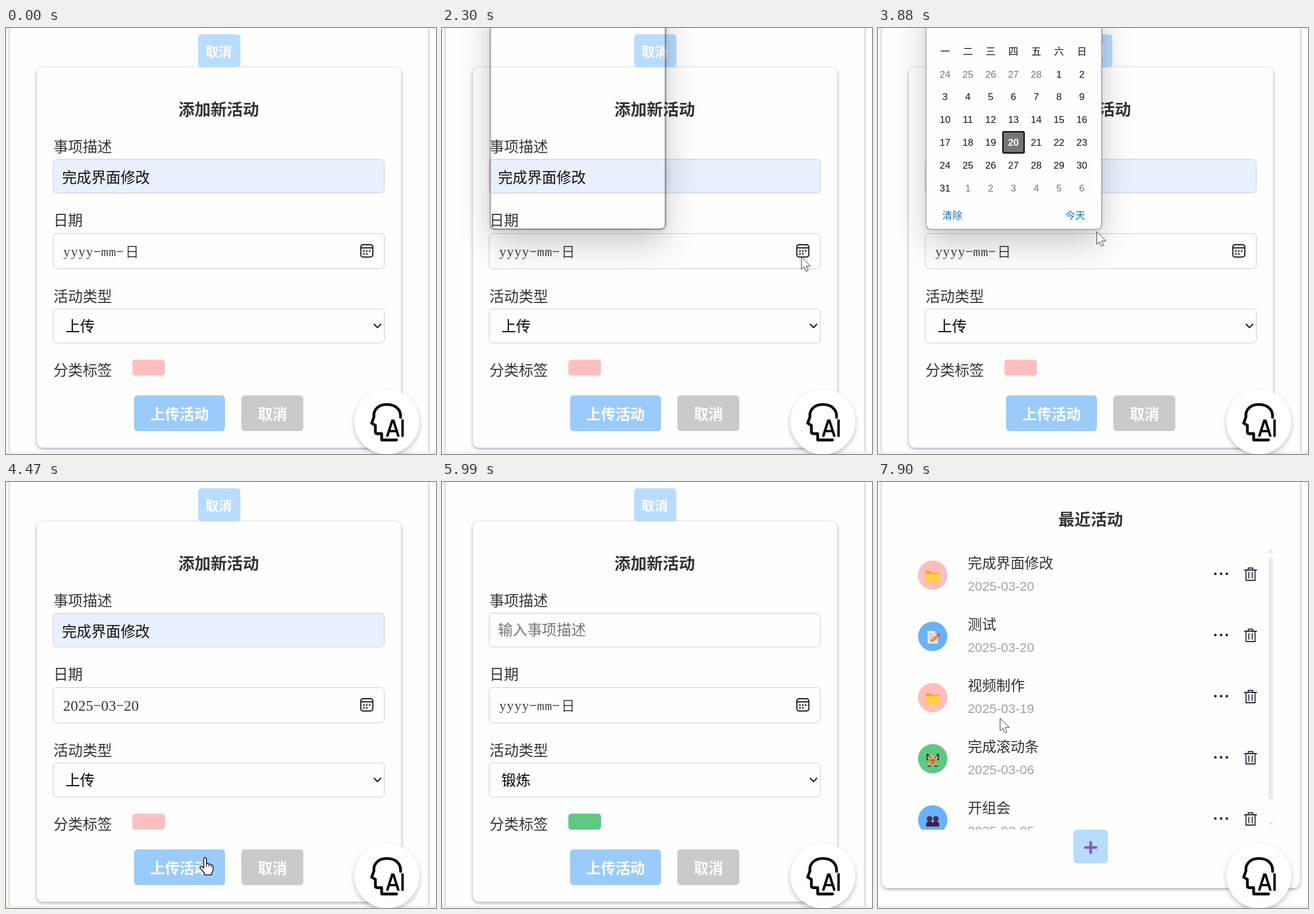
Write an HTML page with a canvas that moves like this. It is 752 px wide and 745 px high and loops after 8000 ms.

```html
<!DOCTYPE html>
<html lang="zh-CN">
<head>
<meta charset="utf-8">
<title>添加新活动</title>
<style>
html, body { margin: 0; width: 100%; height: 100%; overflow: hidden; background: #fff; }
canvas { display: block; width: 752px; height: 745px; }
</style>
</head>
<body>
<canvas id="stage" width="752" height="745"></canvas>
<script>
const ctx = document.getElementById('stage').getContext('2d');
const LOOP = 8000;
const CJK = '"Noto Sans CJK SC", "Noto Sans CJK", sans-serif';
const ARIAL = '"Liberation Sans", Arial, sans-serif';
const SERIF = '"Liberation Serif", serif';
const MONO = '"Liberation Mono", monospace';

// time, x, y of the pointer tip
const PATH = [
  [50, 72, 0], [800, 481, 319], [900, 481, 319], [1000, 498, 335],
  [1670, 591, 380], [1770, 591, 380], [2150, 628, 399], [2300, 628, 400],
  [2560, 567, 438], [2580, 567, 438], [3380, 361, 367], [3480, 361, 367],
  [3880, 382, 356], [4130, 345, 327], [4300, 345, 327], [4460, 348, 657],
  [4490, 348, 657], [4750, 370, 680], [5080, 332, 674], [5180, 331, 674],
  [5990, 331, 674], [6310, 392, 12], [6450, 376, 36], [6560, 376, 36],
  [7100, 192, 381], [7140, 192, 381], [7410, 201, 388], [7650, 202, 389],
  [7900, 213, 413], [8000, 213, 413]
];

const ROWS = [
  ['完成界面修改', '2025-03-20', '#ffbdbd', folder],
  ['测试', '2025-03-20', '#68b1fb', memo],
  ['视频制作', '2025-03-19', '#ffbdbd', folder],
  ['完成滚动条', '2025-03-06', '#5fc882', lifter],
  ['开组会', '2025-03-05', '#68b1fb', people]
];

function pointer(t) {
  let i = 1;
  while (i < PATH.length - 1 && PATH[i][0] < t) i++;
  const [t0, x0, y0] = PATH[i - 1], [t1, x1, y1] = PATH[i];
  const k = Math.min(1, Math.max(0, (t - t0) / (t1 - t0)));
  const e = k * 0.5 + k * k * (3 - 2 * k) * 0.5;
  return [Math.round(x0 + (x1 - x0) * e), Math.round(y0 + (y1 - y0) * e)];
}

function box(x, y, w, h, r, fill, line, lw = 1) {
  ctx.beginPath();
  ctx.roundRect(x, y, w, h, r);
  if (fill) { ctx.fillStyle = fill; ctx.fill(); }
  if (line) { ctx.strokeStyle = line; ctx.lineWidth = lw; ctx.stroke(); }
}

function disc(x, y, r, fill) {
  ctx.beginPath();
  ctx.arc(x, y, r, 0, Math.PI * 2);
  ctx.fillStyle = fill;
  ctx.fill();
}

function trace(d, fill, line, lw = 1) {
  const p = new Path2D(d);
  if (fill) { ctx.fillStyle = fill; ctx.fill(p); }
  if (line) { ctx.strokeStyle = line; ctx.lineWidth = lw; ctx.stroke(p); }
}

function shadowed(dy, blur, alpha, draw) {
  ctx.save();
  ctx.shadowColor = `rgba(0,0,0,${alpha})`;
  ctx.shadowBlur = blur;
  ctx.shadowOffsetY = dy;
  draw();
  ctx.restore();
}

// y is the middle of the line
function cjk(s, x, y, size, color, weight = 350, align = 'left') {
  ctx.font = `${weight} ${size}px ${CJK}`;
  ctx.textAlign = align;
  ctx.fillStyle = color;
  ctx.fillText(s, x, y + size * 0.38);
}

function latin(s, x, base, font, color, align = 'left') {
  ctx.font = font;
  ctx.textAlign = align;
  ctx.fillStyle = color;
  ctx.fillText(s, x, base);
}

function card(x, y, w, h) {
  shadowed(2, 6, 0.36, () => box(x, y, w, h, 11, '#fefefe'));
}

function dateText(s) {
  [...s].forEach((c, i) => {
    const x = 99.5 + 13.3 * (i + 0.5);
    if (c === '日') cjk(c, x + 8, 391, 24, '#444', 300, 'center');
    else if (c === 'm') latin(c, x, 399, `21px ${MONO}`, '#444', 'center');
    else if (c === '-') { ctx.fillStyle = '#444'; ctx.fillRect(x - 5.5, 390, 11, 1.5); }
    else if (c === 'y') latin(c, x, 399, `24px ${SERIF}`, '#444', 'center');
    else latin(c, x, 400, `26px ${SERIF}`, '#333', 'center');
  });
}

function calendarIcon() {
  box(620.5, 379, 21, 21.5, 4, null, '#111', 2);
  ctx.fillStyle = '#111';
  ctx.fillRect(621, 383.5, 20, 2);
  for (let i = 0; i < 5; i++) disc(626 + (i % 3) * 5, i < 3 ? 390 : 395, 1.5, '#111');
}

function form(t) {
  const done = t >= 5990, picked = t >= 4230 && !done;
  card(7, -40, 731, 860);
  card(54, 69, 637, 665);
  box(336, 11, 74, 58, 6, '#b9dcfe');
  cjk('取消', 372, 41, 23, '#fff', 900, 'center');
  cjk('添加新活动', 372, 142, 28.2, '#333', 700, 'center');

  cjk('事项描述', 83, 207, 25.6, '#333');
  cjk('日期', 83, 336, 25.6, '#333');
  cjk('活动类型', 83, 469, 25.6, '#333');
  cjk('分类标签', 83, 598, 25.6, '#333');

  box(82.5, 229.5, 579, 59, 6, done ? '#fefefe' : '#e8f0fe', '#c9c9c9');
  if (done) cjk('输入事项描述', 98, 258, 25.6, '#757575');
  else cjk('完成界面修改', 98, 261, 25.6, '#111');

  box(82.5, 359.5, 579, 61.5, 6, '#fefefe', '#c9c9c9');
  dateText(picked ? '2025-03-20' : 'yyyy-mm-日');
  calendarIcon();

  box(82.5, 491, 579, 60, 6, '#fefefe', '#c9c9c9');
  cjk(done ? '锻炼' : '上传', 104, 521, 25.6, '#000');
  trace('M644 518l5.7 6 5.7-6', null, '#111', 2);

  box(221, 580, 57, 28, 5, done ? '#60c883' : '#ffbfbf');
  const hover = t > 4490 && !done;
  box(224, 642.5, 159, 62.5, 6, hover ? '#90c4f9' : '#9acbfc');
  cjk('上传活动', 303.5, 675.5, 25.6, '#fff', 900, 'center');
  box(411.5, 642.5, 108.5, 62.5, 6, '#cacaca');
  cjk('取消', 466, 675.5, 25.6, '#fff', 900, 'center');
}

function popup(open) {
  const shape = () => ctx.roundRect(84, -60, 307.5, 412.5, 8);
  ctx.save();
  ctx.beginPath();
  ctx.rect(0, -200, 752, 945);
  shape();
  ctx.clip('evenodd');
  for (const [dy, blur, a] of [[26, 58, 0.2], [1, 10, 0.1]])
    shadowed(dy, blur, a, () => { ctx.beginPath(); shape(); ctx.fillStyle = '#000'; ctx.fill(); });
  ctx.restore();
  if (!open) {
    box(84.5, -60, 306, 411.5, 8, null, 'rgba(90,90,90,.48)', 2.5);
    return;
  }
  box(84.5, -60, 306.5, 412, 8, '#fefefe', '#a4a4a4', 1.2);
  const colX = c => 117.3 + c * 39.85;
  [...'一二三四五六日'].forEach((c, i) => cjk(c, colX(i), 41, 17, '#111', 400, 'center'));
  for (let i = 0; i < 42; i++) {
    const day = i < 5 ? 24 + i : i < 36 ? i - 4 : i - 35;
    const other = i < 5 || i > 35, today = i === 24;
    const x = colX(i % 7), y = 80.5 + Math.floor(i / 7) * 39.85;
    if (today) box(218.5, 181.5, 37, 37, 2, '#767676', '#111', 2.5);
    latin(day, x, y + 6, `${today ? 'bold ' : ''}17px ${ARIAL}`,
      today ? '#fff' : other ? '#767676' : '#111', 'center');
  }
  cjk('清除', 112.5, 327.5, 17.4, '#0074d1');
  cjk('今天', 327.5, 327.5, 17.4, '#0074d1');
}

function folder() {
  trace('M-12-9h8l3 3h12q1 0 1 1v6h-24z', '#f5a81c');
  box(-12, -4, 24, 15, 1.5, '#ffd140');
}

function memo() {
  trace('M-9-11h12l6 6v16h-18z', '#f1eaf5');
  trace('M3-11v6h6z', '#cbbdda');
  trace('M-6-5h7M-6-1h9M-6 3h5', null, '#b7a5c8', 1.3);
  trace('M-4 8l2-5 9-8 4 4-9 8z', '#ff8a2a');
  trace('M7-5l2-2q3 0 4 4l-2 2z', '#e6395d');
  trace('M-4 8l1.3-3 1.8 2z', '#50333c');
}

function lifter() {
  trace('M-9-4h18', null, '#474052', 1.6);
  box(-11, -10, 4, 11, 1, '#393344');
  box(7, -10, 4, 11, 1, '#393344');
  trace('M-8-4l4 5M8-4l-4 5', null, '#ffb04a', 3);
  disc(0, -4.5, 3.2, '#ffb04a');
  trace('M-5-1h10l-1.5 8h-7z', '#f4572e');
  trace('M-3 5l-4 2 1 4M3 5l4 2-1 4', null, '#ffa23d', 2.6);
  trace('M-8 11.5h4M4 11.5h4', null, '#393344', 2);
}

function people() {
  for (const x of [-5.5, 5.5]) {
    disc(x, -3.5, 4.8, '#4b2c53');
    trace(`M${x - 6} 10v-4q0-5 6-5t6 5v4z`, '#3b2247');
  }
}

function trash(x, y) {
  trace(`M${x - 10.5} ${y - 7}h21M${x - 4} ${y - 7}v-3.5h8v3.5M${x - 8} ${y - 7}v18h16v-18` +
    `M${x - 3} ${y - 3}v10M${x + 3} ${y - 3}v10`, null, '#24243a', 1.8);
}

function list() {
  card(7, -40, 731, 750);
  cjk('最近活动', 372, 65, 28.2, '#333', 700, 'center');
  ctx.save();
  ctx.beginPath();
  ctx.rect(0, 0, 752, 608);
  ctx.clip();
  ROWS.forEach(([name, date, color, icon], i) => {
    const y = 163 + i * 107;
    disc(95.7, y, 25.7, color);
    ctx.save();
    ctx.translate(95.7, y + 1.5);
    icon();
    ctx.restore();
    cjk(name, 157, y - 21, 24.9, '#333');
    latin(date, 157, y + 27, `22.7px ${ARIAL}`, '#a2a2ac');
    for (let k = 0; k < 3; k++) box(588 + k * 10, y - 4.5, 4, 4, 1, '#111');
    trash(651.5, y - 2);
  });
  box(683, 132, 8, 423, 4, '#ebebeb');
  trace('M682.5 124l4.5-6.5 4.5 6.5zM682.5 594.5l4.5 6.5 4.5-6.5z', '#e6e6e6');
  ctx.restore();
  box(342, 608, 60, 59, 6, '#b9dcfe');
  trace('M372 630v18.5M362.8 639.2h18.5', null, '#7b5bc4', 4.6);
}

function assistant() {
  shadowed(4, 8, 0.24, () => disc(666, 688.5, 57, '#fff'));
  trace('M690 681C691 667 681 658.3 666 658.3C650 658.3 642 669 643.5 680L639.5 691L646 695' +
    'V706Q646 709.5 650 709.5H657V720.5H683', null, '#000', 4.8);
  trace('M667 713L675.5 686.5H677.5L686 713M670 705H683M693.5 686V713.5', null, '#000', 4.2);
}

function arrow(x, y) {
  ctx.save();
  ctx.translate(x + 0.5, y + 0.5);
  trace('M0 0V21.5L4.8 17.2L8.2 25.2L12 23.6L8.7 15.8H15.5Z', '#fff', '#334', 1);
  ctx.restore();
}

function hand(x, y) {
  ctx.save();
  ctx.translate(x, y);
  trace('M-2.2 2.2Q-2 0 .2 0Q2.4 0 2.6 2.2V11Q5 9 7 11.5Q9.5 10.5 11 13Q14 12.5 14.3 16V21' +
    'Q14 25 11.5 27V30H-1V27L-8.5 18Q-9.5 15.5-7 15Q-5 15-2.2 18Z', '#fff', '#111', 1.5);
  trace('M2.6 11v4M7 11.8v4M11 13.2v3.4', null, '#111', 1.2);
  ctx.restore();
}

function draw(t) {
  ctx.clearRect(0, 0, 752, 745);
  ctx.fillStyle = '#fff';
  ctx.fillRect(0, 0, 752, 745);
  ctx.lineCap = ctx.lineJoin = 'round';
  const listed = t >= 6550;
  if (listed) list(); else form(t);
  ctx.fillStyle = '#f0f0f0';
  ctx.fillRect(0, 741.5, 752, 4);
  assistant();
  if (t >= 2300 && t < 4230) popup(t >= 2340);
  if (t < 50 || (t >= 5990 && t < 6310)) return;
  const [x, y] = pointer(t);
  if (!listed && y > 642) hand(x, y); else arrow(x, y);
}

const start = performance.now();
function tick() {
  draw((performance.now() - start) % LOOP);
  requestAnimationFrame(tick);
}
tick();
</script>
</body>
</html>
```
